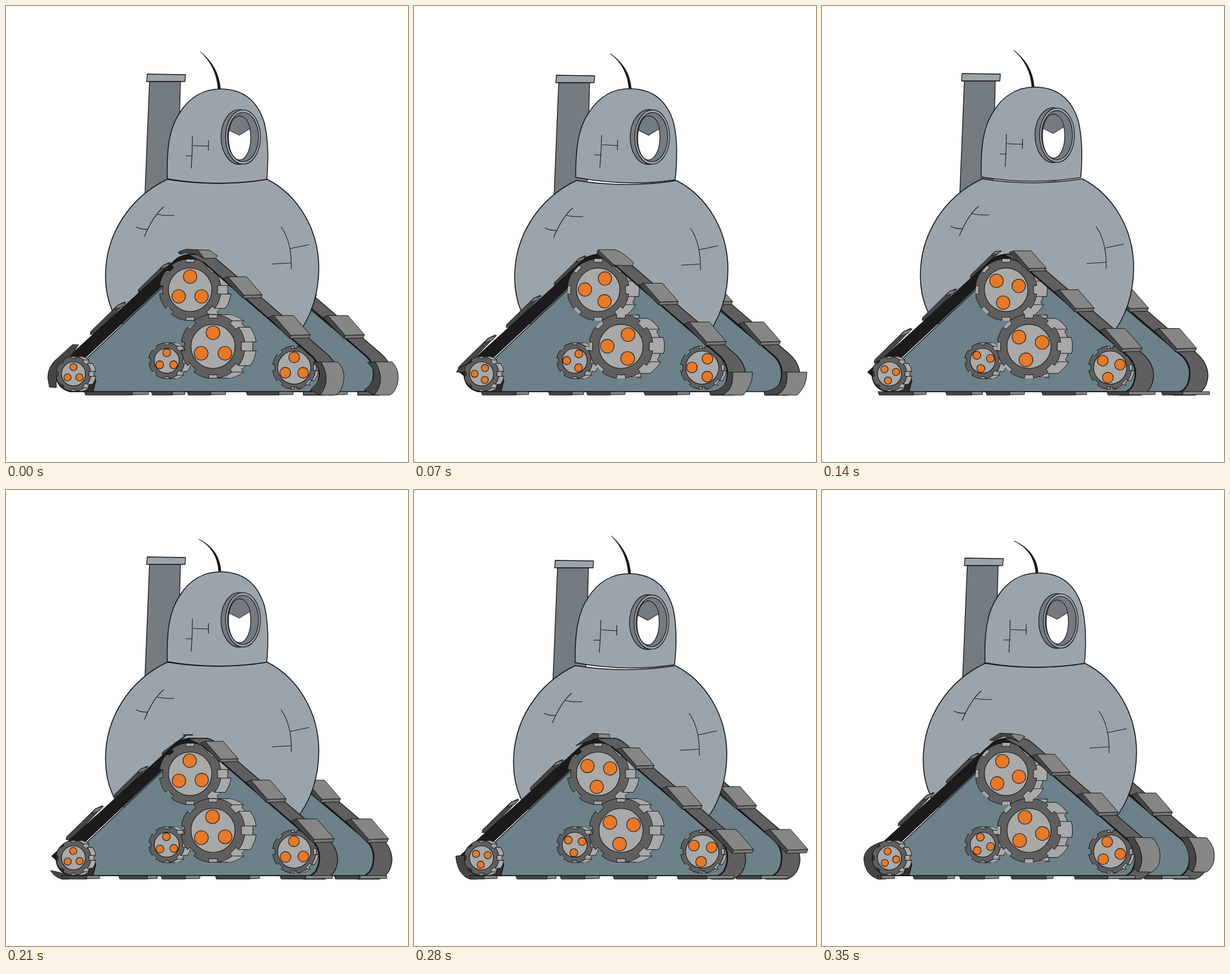
An HTML page with a canvas that plays this animation: 703x797 px, repeating every 0.42 s.

```html
<!DOCTYPE html>
<html lang="en">
<head>
<meta charset="utf-8">
<title>Tracked robot</title>
<style>
html, body { margin: 0; width: 100%; height: 100%; overflow: hidden; background: #fff; }
canvas { display: block; }
</style>
</head>
<body>
<canvas id="stage" width="703" height="797"></canvas>
<script>
const ctx = document.getElementById('stage').getContext('2d');
const STEP = 70, STEPS = 6, TAU = Math.PI * 2;
const INK = '#141414', SHELL = '#9ca4ab', SHADE = '#747b81', PLATE = '#6c8189',
      BELT = '#5f5f5f', DARK = '#454545', LIGHT = '#858785', METAL = '#a9a9a9', ORANGE = '#e67929';

// Pose of each step
const bodyShift = [[0, 0], [2, 2], [-2, -1], [0, -2], [0, 4], [3, 0]];
const headPose = [[0, 0, 0], [.7, -.7, 1.1], [-3.5, -3.2, 0], [0, -2, 0], [-.3, 1.2, .9], [3, 0, 0]];
const antenna = [[373, 145, 340, 80], [378, 145, 343, 83], [369, 141, 335, 77],
                 [374, 142, 337, 86], [377, 146, 345, 80], [376, 145, 336, 89]];
const spin = [0, 31, 73, -2, 66, -17];

function shape(d, fill, width = 1.3) {
  const p = new Path2D(d);
  if (fill) { ctx.fillStyle = fill; ctx.fill(p); }
  if (width) { ctx.lineWidth = width; ctx.strokeStyle = INK; ctx.stroke(p); }
}

function poly(points, fill, width = 1) {
  shape('M' + points.map(p => p.join()).join('L') + 'Z', fill, width);
}

function oval(x, y, rx, ry, fill, width = 1.2) {
  ctx.beginPath();
  ctx.ellipse(x, y, rx, ry, 0, 0, TAU);
  ctx.fillStyle = fill;
  ctx.fill();
  if (width) { ctx.lineWidth = width; ctx.strokeStyle = INK; ctx.stroke(); }
}

function at(x, y, draw, deg = 0, px = 0, py = 0) {
  ctx.save();
  ctx.translate(x + px, y + py);
  ctx.rotate(deg * Math.PI / 180);
  ctx.translate(-px, -py);
  draw();
  ctx.restore();
}

function chimney() {
  shape('M251,132L305,132L300,330L243,328Z', SHADE);
  shape('M247,119L314,120L313,132L246,132Z', SHELL);
}

function body() {
  shape('M282,303C215,335 174,400 174,472C174,495 178,515 186,533L194,550L300,600L505,580' +
        'C535,545 547,500 547,458C547,390 510,330 457,303Q370,317 282,303Z', SHELL, 1.6);
  shape('M276,351Q258,365 242,403M264,364Q278,367 294,366M227,386Q237,391 247,390' +
        'M481,386Q500,412 499,460M497,424L530,417M465,451L498,449', null, 1.1);
}

function head() {
  shape('M282,302C281,250 285,215 303,188C320,160 345,145 375,145C415,145 440,165 452,205' +
        'C459,235 459,270 456,303Q370,317 282,302Z', SHELL, 1.5);
  shape('M326,227Q326,255 324,284M327,244L354,245M354,235L354,253M314,262L326,262', null, 1.1);
  oval(408, 229, 32, 48, SHADE);
  oval(414.5, 229, 30.5, 47.5, SHELL);
  oval(414.5, 229, 27, 43, SHADE);
  oval(408.5, 230.5, 19.5, 38.5, '#fff');
  shape('M390,217Q395,193 408,192Q422,193 427,214L408,226Z', SHADE, 1);
}

function drawAntenna([bx, by, tx, ty]) {
  const cx = bx - 4, cy = by - 39;
  shape(`M${bx - 2},${by}Q${cx - 1},${cy} ${tx},${ty}Q${cx + 3},${cy} ${bx + 2},${by}Z`, INK, .8);
}

// Tread on the underside: dark part, then a light end
function underTread(from, split, to) {
  poly([[from, 674], [split, 674], [split, 680], [from + 2, 680]], DARK);
  poly([[split, 674], [to, 674], [to, 679], [split, 679.5]], LIGHT);
}

function slopeTread(n) {
  const s = 1 + .012 * n, x = 335 + 13.3 * n + (n > 13 ? 6 : 0), y = 428 + 11.3 * n + (n > 13 ? 7 : 0);
  const p = (a, b) => [x + a * s, y + b * s];
  poly([p(0, 0), p(-8, 3), p(25, 36), p(27, 31)], DARK);
  poly([p(27, 31), p(57, 30), p(55, 35), p(25, 36)], '#747674');
  poly([p(0, 0), p(31, 0), p(57, 30), p(27, 31)], LIGHT);
}

const frontEnd = {
  5: ['M532,607L545,607Q569,642 553,667L545,662Q553,636 532,607Z',
      'M545,607L578,608Q593,624 591,643Q590,660 577,668L553,667Q569,642 545,607Z'],
  0: ['M537,623L551,622Q570,655 549,680L532,671Q553,655 547,634Z',
      'M551,622L580,622Q592,634 591,652Q588,675 576,680L549,680Q570,655 551,622Z'],
  1: ['M548,640L557,640Q560,672 538,680L518,680L517,674Q550,670 548,640Z',
      'M557,640L592,640Q592,665 575,680L538,680Q560,672 557,640Z']
};

// Descending half of a track, shared by the near and far sides
function descent(k, dx) {
  const under = (a, b, c) => {
    const lo = dx ? 562 - dx : 0;
    if (c > lo) underTread(Math.max(a, lo), Math.max(b, lo), c);
  };
  at(dx, 0, () => {
    if (dx) shape('M355,462L535,612Q549,626 548,645Q546,668 532,674L380,674Z', PLATE);
    under(420 - 18 * k, 477 - 17 * k, 502 - 19.6 * k);
    shape('M318,434L352,434Q361,436 369,443L560,607Q580,624 580,647Q578,672 558,680L520,680L520,674' +
          'L532,674Q546,668 548,645Q549,626 535,612L345,448Z', BELT);
    shape('M345,448L535,612Q549,626 548,645Q546,668 532,674', null, 2.6);
    if (k > 1) under(537 - 19.3 * k, 560 - 12 * k, 606 - 11.7 * k);
    for (let n = (k + 4) % 6; n < 15; n += 6) slopeTread(n);
    if (frontEnd[k]) {
      shape(frontEnd[k][0], DARK, 1);
      shape(frontEnd[k][1], LIGHT, 1);
    }
  });
}

function climbTread(m) {
  const s = 1.04 - .015 * m, x = 77 + 14 * m, y = 636 - 12.4 * m;
  const p = (a, b) => [x + a * s, Math.max(y + b * s, 428)];
  poly([p(0, 0), p(1, -5), p(50, -53), p(63, -59), p(52, -45), p(8, 0)], DARK);
  poly([p(44, -45), p(51, -54), p(65, -58), p(58, -50)], '#777977');
}

const rearEnd = [
  'M127,592L116,592L92,614Q73,628 73,650L76,666L88,667Q86,635 112,614Z',
  'M74,640L88,640L95,625L80,632Z',
  '',
  'M78,665L92,668L112,674L110,680L97,680Q84,676 78,665Z',
  'M73,640L88,638Q88,668 112,674L110,680L97,680Q76,672 73,640Z',
  'M112,613Q74,622 73,645Q75,672 97,680L112,680L112,674Q86,666 88,640Q92,622 112,613Z'
];

const cap = {
  4: ['M283,447L313,425L322,426L322,433L303,440Z', 'M322,426L342,427L342,434L322,433Z'],
  5: ['M293,437L311,425L333,426L345,440L318,430L300,438Z', 'M333,431L330,426L347,428L355,431L345,440Z'],
  0: ['M301,430L315,425L335,426L346,441Q325,427 304,434Z', 'M335,426L356,427L370,437L366,441L346,441Z'],
  1: ['M322,426L320,433L347,456L350,450Z', 'M322,426L352,426Q368,432 384,449L381,454L350,453Z']
};

function gear(x, y, R, r, depth, orbit, dot, turn, sideTurn) {
  const N = 8, pitch = TAU / N, gap = pitch * .18;
  const outline = (dx, extra) => {
    ctx.beginPath();
    for (let i = 0; i < N; i++) {
      const a = i * pitch + extra;
      ctx.arc(x + dx, y, R, a + gap, a + pitch - gap);
      ctx.arc(x + dx, y, R * .89, a + pitch - gap, a + pitch + gap);
    }
    ctx.closePath();
  };
  ctx.lineWidth = 1;
  ctx.strokeStyle = INK;
  ctx.fillStyle = METAL;
  outline(depth, sideTurn);
  ctx.fill();
  ctx.stroke();
  for (let d = depth - 1; d > 0; d--) { outline(d, sideTurn); ctx.fill(); }
  ctx.beginPath();
  for (let i = 0; i < N * 2; i++) {
    const a = (i >> 1) * pitch + (i & 1 ? gap : -gap) + sideTurn;
    if (Math.cos(a) < -.2) continue;
    const ex = x + R * Math.cos(a), ey = y + R * Math.sin(a);
    ctx.moveTo(ex, ey);
    ctx.lineTo(ex + depth, ey);
  }
  ctx.stroke();
  outline(0, 0);
  ctx.fillStyle = BELT;
  ctx.fill();
  ctx.stroke();
  oval(x, y, r, r, METAL, 1.1);
  for (let i = 0; i < 3; i++) {
    const a = (turn - 90 + i * 120) * Math.PI / 180;
    oval(x + orbit * Math.cos(a), y + orbit * Math.sin(a), dot, dot, ORANGE, 1.1);
  }
}

function nearTrack(k) {
  shape('M300,465L275,490L140,617L157,655L150,674L532,674Q546,668 548,645Q549,626 535,612L340,440Z', PLATE);
  // climbing belt
  for (let m = (k + 5) % 6; m < 15; m += 6) climbTread(m);
  shape('M80,640L300,440Q320,430 345,436L350,450L325,444Q303,446 294,464L272,490L136,617L105,628L92,650Z', '#1b1b1b');
  shape('M112,613Q87,622 87,645Q90,670 112,674L152,674L157,655L136,617Z', '#303030');
  if (rearEnd[k]) shape(rearEnd[k], DARK, 1);
  shape('M110,674L532,674', null, 1.3);
  // underside
  if (k) underTread(Math.max(137 - 19.5 * k, 97), 197 - 18.6 * k, 219 - 18.4 * k);
  else underTread(137, 221, 249);
  underTread(254 - 19 * k, 291 - 14.6 * k, 313 - 16.2 * k);
  underTread(317 - 15.4 * k, 358 - 14.8 * k, 384 - 15 * k);

  const turn = spin[k], side = [1, 2, 5].includes(k) ? .36 : 0;
  gear(322, 496, 54, 38, 18, 23, 11.7, turn, side);
  gear(281, 620, 31.5, 21.8, 11, 14, 6.9, turn, 0);
  gear(362, 595, 56, 38.5, 20, 24, 12, turn, side);
  gear(504, 632, 38, 29, 5, 18, 9.4, turn, 0);
  gear(118, 643, 30.5, 21, 9, 12, 6.3, turn, 0);

  descent(k, 0);
  if (cap[k]) {
    shape(cap[k][0], DARK, 1);
    shape(cap[k][1], LIGHT, 1);
  }
}

function render(k) {
  ctx.fillStyle = '#fff';
  ctx.fillRect(0, 0, 703, 797);
  ctx.lineJoin = 'round';
  const [bx, by] = bodyShift[k], [hx, hy, tilt] = headPose[k];
  at(bx, by, chimney);
  descent(k, 95);
  at(bx, by, body);
  drawAntenna(antenna[k]);
  at(hx, hy, head, tilt, 370, 302);
  nearTrack(k);
}

const start = performance.now();
function tick() {
  render(Math.floor((performance.now() - start) / STEP) % STEPS);
  requestAnimationFrame(tick);
}
tick();
</script>
</body>
</html>
```
